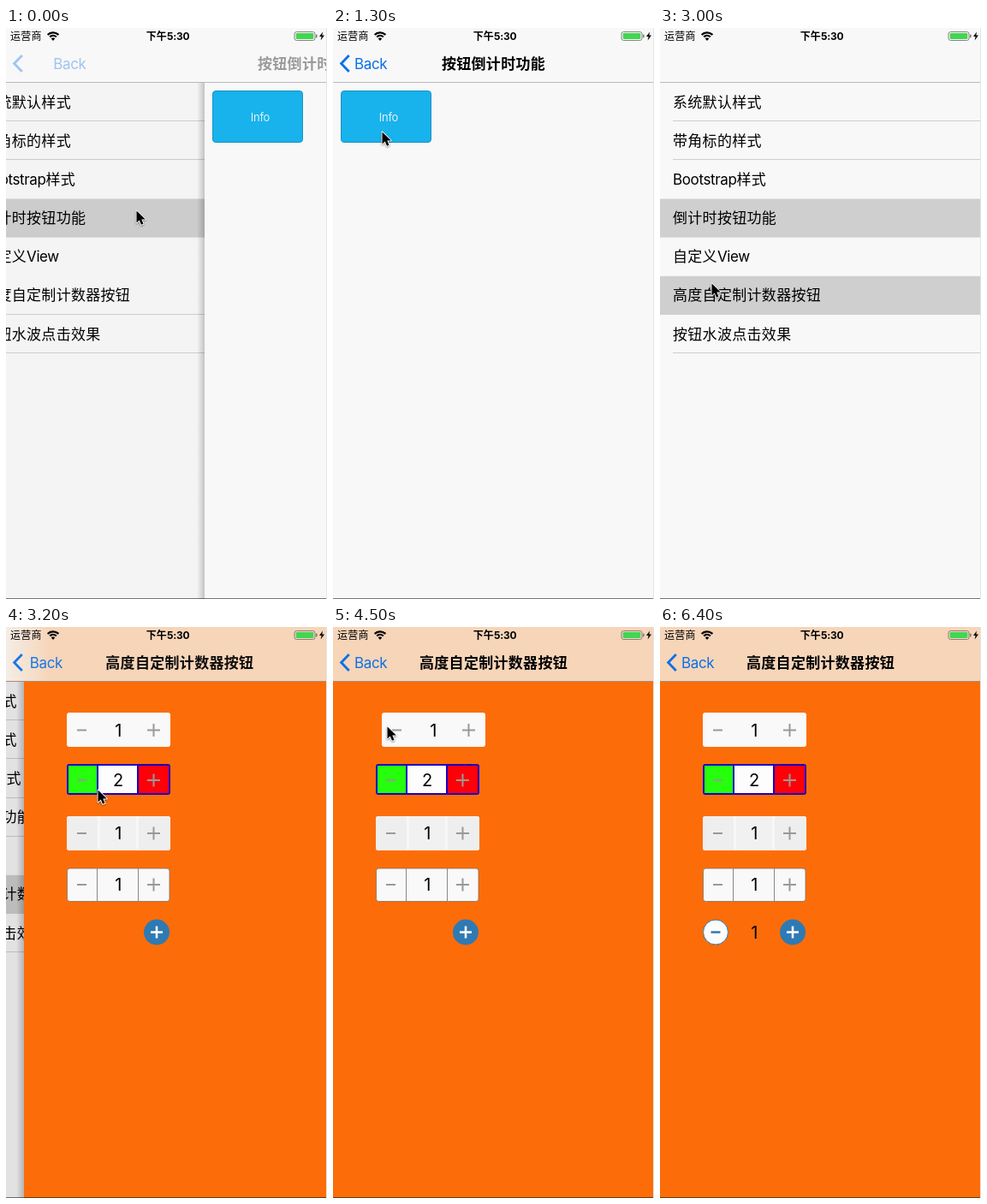
Animation of 375 by 667 pixels, one loop 6500 ms. Source, as an HTML page with a canvas:

```html
<!DOCTYPE html>
<html lang="zh-CN">
<head>
<meta charset="utf-8">
<style>
html, body { margin: 0; width: 100%; height: 100%; overflow: hidden; background: #f8f8f8; }
canvas { display: block; width: 375px; height: 667px; }
</style>
</head>
<body>
<canvas id="stage"></canvas>
<script>
const W = 375, H = 667, LOOP = 6500, STEP = 100, BAR = 64, ROW = 45.17;
const canvas = document.getElementById('stage');
const ctx = canvas.getContext('2d');
const dpr = window.devicePixelRatio || 1;
canvas.width = W * dpr;
canvas.height = H * dpr;
ctx.scale(dpr, dpr);

const PAPER = '#f8f8f8', ORANGE = '#fc6d0a', BLUE = '#0b70e8', GREY = '#999';
const ROWS = ['系统默认样式', '带角标的样式', 'Bootstrap样式', '倒计时按钮功能',
  '自定义View', '高度自定制计数器按钮', '按钮水波点击效果'];
const TIMER = { start: -49, end: 2278, title: '按钮倒计时功能' };
const COUNTER = { start: 3030, end: Infinity, title: '高度自定制计数器按钮' };
const TICK_AT = 1500, SHAKE_AT = 4300, EXPAND_AT = 5050, HIDE_AT = 5900;

// Pointer stops: time, x, y
const POINTER = [
  [0, 152, 213], [700, 62, 120], [1300, 57, 121], [1600, 57, 121], [2150, 46, 29],
  [2350, 46, 29], [2850, 60, 297], [3030, 60, 298], [3200, 107, 190], [3500, 107, 180],
  [4100, 63, 116], [4600, 63, 116], [4900, 150, 366], [5050, 151, 358], [5600, 151, 356],
  [5800, 240, 335]
];

const clamp = v => Math.max(0, Math.min(1, v));
const ease = v => v * v * (3 - 2 * v);

// Critically damped spring, 1 down to 0
function spring(ms) {
  const k = Math.max(0, ms) * 0.027;
  return (1 + k) * Math.exp(-k);
}

function rect(x, y, w, h, fill) {
  ctx.fillStyle = fill;
  ctx.fillRect(x, y, w, h);
}

function rounded(x, y, w, h, r, fill, stroke, lw = 1) {
  ctx.beginPath();
  ctx.roundRect(x, y, w, h, r);
  if (fill) { ctx.fillStyle = fill; ctx.fill(); }
  if (stroke) { ctx.strokeStyle = stroke; ctx.lineWidth = lw; ctx.stroke(); }
}

function disc(x, y, r, fill, stroke) {
  ctx.beginPath();
  ctx.arc(x, y, r, 0, 7);
  ctx.fillStyle = fill;
  ctx.fill();
  if (stroke) { ctx.strokeStyle = stroke; ctx.lineWidth = 1; ctx.stroke(); }
}

function poly(points, fill, stroke, lw = 1) {
  ctx.beginPath();
  points.forEach(([x, y]) => ctx.lineTo(x, y));
  if (fill) { ctx.closePath(); ctx.fillStyle = fill; ctx.fill(); }
  if (stroke) { ctx.strokeStyle = stroke; ctx.lineWidth = lw; ctx.stroke(); }
}

// Mixed text: Latin is set slightly tight, Chinese slightly loose
function text(str, x, cy, size, { color = '#000', weight = 400, center = false } = {}) {
  const runs = str.match(/[ -~]+|[^ -~]+/g);
  const style = run => {
    const latin = /^[ -~]/.test(run);
    ctx.font = `${weight} ${size}px ${latin ? 'Inter' : '"Noto Sans CJK SC"'}, sans-serif`;
    ctx.letterSpacing = size * (latin ? -0.022 : 0.018) + 'px';
    return ctx.measureText(run).width;
  };
  if (center) x -= runs.reduce((sum, run) => sum + style(run), 0) / 2;
  ctx.fillStyle = color;
  for (const run of runs) {
    const w = style(run);
    ctx.fillText(run, x, cy + size * 0.37);
    x += w;
  }
}

function sign(x, y, size, color, plus, lw = 2) {
  rect(x - size / 2, y - lw / 2, size, lw, color);
  if (plus) rect(x - lw / 2, y - size / 2, lw, size, color);
}

function drawList(t, shown, dim) {
  const picked = i => (i === 3 && t < 3100) || (i === 5 && t >= 2900);
  rect(0, 0, W, H, PAPER);
  ctx.save();
  ctx.translate(-112.5 * shown, 0);
  ROWS.forEach((label, i) => {
    const y = BAR + i * ROW;
    if (picked(i)) rect(0, y, W + 113, ROW, '#cfcfcf');
    else if (!picked(i + 1) && i !== 4) rect(15, Math.round(y + ROW) - 1, W, 1, '#cfced2');
    text(label, 15, y + 22.3, 17);
  });
  ctx.restore();
  rect(0, 0, W, H, `rgba(0,0,0,${dim})`);
}

function drawTimer(t) {
  rect(0, 0, W, H, PAPER);
  rounded(9.5, 73.5, 105, 60, 3.5, '#18b2ec', '#1993c6');
  const ticking = t >= TICK_AT;
  text(ticking ? '5秒重新获取' : 'Info', 65, 104, ticking ? 14 : 13, { color: '#dcf3fc', center: true });
}

function value(n, y) {
  text(n, 110, y, 20, { center: true });
}

function signs(y) {
  sign(67.5, y, 11, GREY, false);
  sign(151.5, y, 15, GREY, true);
}

function drawCounter(t) {
  rect(0, 0, W, H, ORANGE);

  const since = t - SHAKE_AT;
  const phase = (since % 140) / 70;
  const shake = since >= 0 && since < 420 ? -10 + 20 * (phase < 1 ? phase : 2 - phase) : 0;
  ctx.save();
  ctx.translate(Math.round(shake), 0);
  rounded(50, 100, 121, 40, 3, '#f9f9f9');
  signs(120.5);
  value('1', 120.5);
  ctx.restore();

  rounded(50, 160, 121, 36, 3, '#1a00c4');
  rect(52, 162, 33, 32, '#25ff0c');
  rect(87, 162, 45, 32, '#fdfdfd');
  rect(134, 162, 35, 32, '#ff0008');
  signs(179);
  value('2', 179);

  rounded(50, 221, 121, 40, 3, '#f7f7f7');
  rounded(50, 221, 36, 40, 3, '#eeeeee');
  rect(89, 221, 42, 40, '#f1f1f1');
  rounded(134, 221, 37, 40, 3, '#eeeeee');
  signs(241);
  value('1', 241);

  rounded(50.5, 282, 119.5, 38.5, 3, '#f9f9f9', '#85705f', 0.8);
  rect(85, 282, 1, 38, '#888');
  rect(133, 282, 1, 38, '#888');
  signs(301);
  value('1', 301);

  const open = ease(clamp((t - EXPAND_AT) / 300));
  if (open > 0) {
    ctx.save();
    ctx.translate(155 - 90 * open, 356.5);
    ctx.rotate(-Math.PI * 2 * open);
    disc(0, 0, 14.5, '#fcfcfc', '#2f7ab3');
    sign(0, 0, 11, '#2f7ab3', false, 2.5);
    ctx.restore();
    if (open === 1) value('1', 356.5);
  }
  disc(155, 356.5, 15, '#2f7ab3');
  sign(155, 356.5, 14, '#fff', true, 2.5);
}

function drawStatus() {
  text('运营商', 5, 9.5, 12);
  text('下午5:30', 189, 9.5, 12, { weight: 700, center: true });
  ctx.strokeStyle = '#000';
  ctx.lineWidth = 2.2;
  for (const r of [5.2, 8.7]) {
    ctx.beginPath();
    ctx.arc(55, 14, r, -Math.PI * 0.76, -Math.PI * 0.24);
    ctx.stroke();
  }
  poly([[55, 15], [52.7, 12.3], [55, 11.3], [57.3, 12.3]], '#000');
  rounded(337, 4.5, 24, 10, 2.5, null, '#777', 0.9);
  rounded(338.7, 6, 20.6, 7, 1.2, '#43d551');
  rounded(362, 7.5, 1.5, 4, 1, '#777');
  poly([[370, 4.5], [366, 10], [368.6, 10], [367.6, 14.5], [372, 8.6], [369.3, 8.6]], '#000');
}

function drawBar(page, rest, popping) {
  const shown = 1 - rest, x = rest * W;
  rect(0, 0, W, BAR, PAPER);
  if (page === COUNTER) {
    const tint = '#f6d5b9';
    let fill = tint;
    if (x > 1) {
      fill = ctx.createLinearGradient(x - 30, 0, x + 30, 0);
      fill.addColorStop(0, '#f4f1ee');
      fill.addColorStop(1, tint);
    }
    rect(0, 0, W, BAR, fill);
  }
  rect(0, 63, W, 1, page === COUNTER ? '#a88c78' : '#b9b9ba');
  if (page && shown > 0.01) {
    ctx.globalAlpha = popping ? shown * 0.3 : shown;
    poly([[18.8, 32], [9.6, 41.5], [18.8, 51]], null, BLUE, 2.8);
    text('Back', 25 + rest * (popping ? 35 : 49), 41.5, 17, { color: BLUE });
    ctx.globalAlpha = shown;
    text(page.title, 187.5 + x * (popping ? 0.46 : 0.72), 41.5, 17, { weight: 600, center: true });
    ctx.globalAlpha = 1;
  }
  drawStatus();
}

function drawPointer(t) {
  if (t >= HIDE_AT) return;
  let i = POINTER.findIndex(p => p[0] > t);
  if (i < 0) i = POINTER.length - 1;
  const [t0, x0, y0] = POINTER[i - 1], [t1, x1, y1] = POINTER[i];
  const k = ease(clamp((t - t0) / (t1 - t0)));
  ctx.save();
  ctx.translate(x0 + (x1 - x0) * k, y0 + (y1 - y0) * k);
  ctx.lineJoin = 'round';
  ctx.shadowColor = 'rgba(0,0,0,.35)';
  ctx.shadowBlur = 2;
  ctx.shadowOffsetY = 1;
  const arrow = [[0.5, 0.5], [0.5, 14.5], [3.8, 11.5], [6, 16.8], [8.5, 15.8], [6.3, 10.6], [10.8, 10.6]];
  poly([...arrow, arrow[0]], '#000', '#fff', 1.8);
  ctx.shadowColor = 'transparent';
  poly(arrow, '#000');
  ctx.restore();
}

function draw(t) {
  const page = t >= COUNTER.start ? COUNTER : t < 2800 ? TIMER : null;
  const popping = page === TIMER && t >= TIMER.end;
  let rest = 1;
  if (page) rest = popping ? 1 - spring(t - page.end) : spring(t - page.start);
  const x = Math.round(rest * W), shown = 1 - rest;

  if (x > 0) drawList(t, shown, 0.1 * (popping ? shown : shown * shown));
  if (page) {
    if (x > 0) {
      const shade = ctx.createLinearGradient(x - 9, 0, x, 0);
      shade.addColorStop(0, 'rgba(0,0,0,0)');
      shade.addColorStop(1, 'rgba(0,0,0,.2)');
      rect(x - 9, BAR, 9, H, shade);
    }
    ctx.save();
    ctx.translate(x, 0);
    page === TIMER ? drawTimer(t) : drawCounter(t);
    ctx.restore();
  }
  drawBar(page, rest, popping);
  rect(0, 666, W, 1, 'rgba(0,0,0,.52)');
  rect(374, 0, 1, H, '#e4e4e4');
  drawPointer(t);
}

function frame() {
  const t = performance.now() % LOOP;
  draw(Math.floor(t / STEP) * STEP);
  requestAnimationFrame(frame);
}
frame();
</script>
</body>
</html>
```
